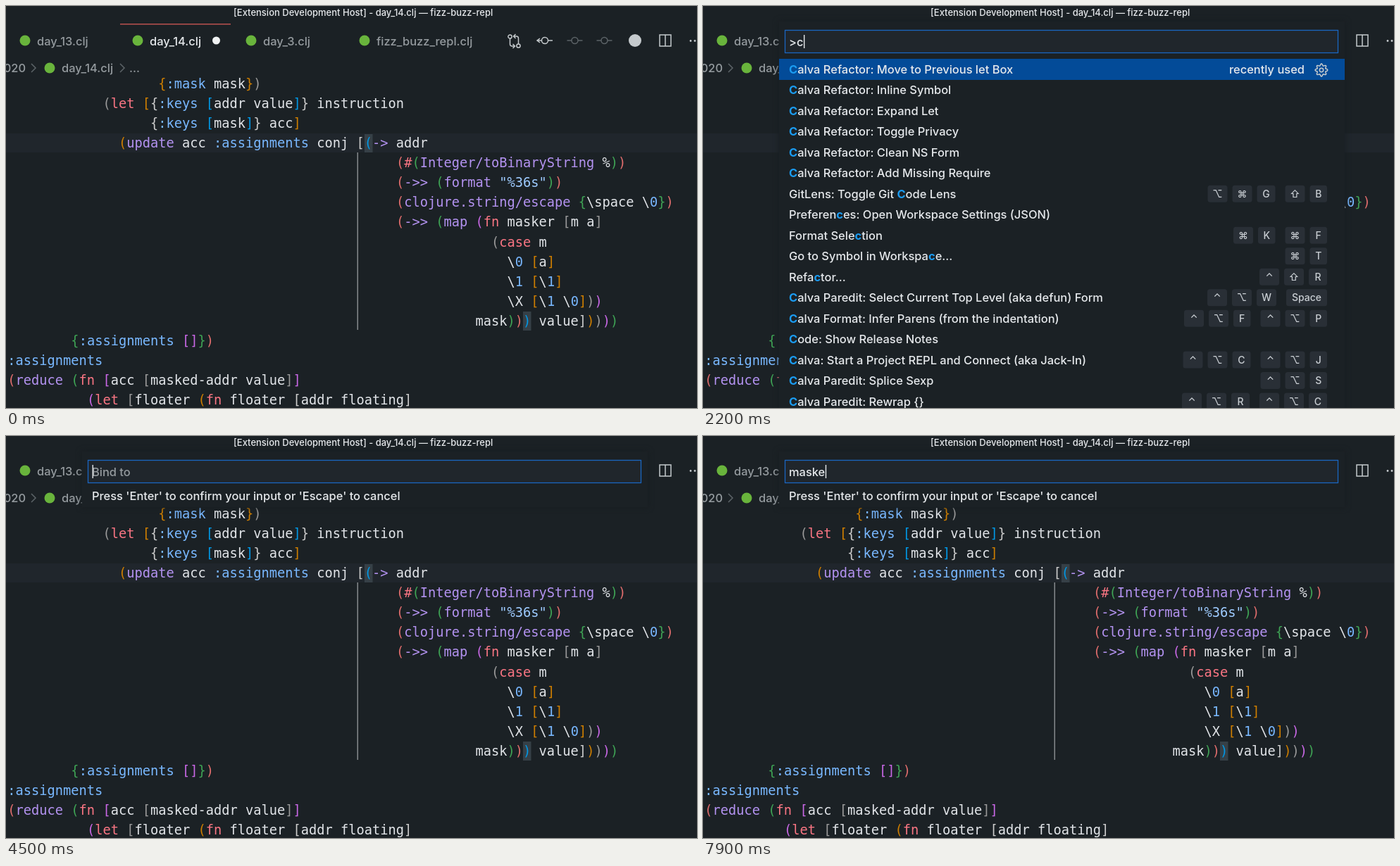
These frames come from a looping animation (981 by 571 pixels, 8 s). An HTML page:

```html
<!DOCTYPE html>
<html lang="en">
<head>
<meta charset="utf-8">
<title>Command palette</title>
<style>
  html, body { margin: 0; width: 100%; height: 100%; overflow: hidden; background: #1b2125; }
  svg { display: block; width: 981px; height: 571px; }
  text { white-space: pre; }
  .ui { font: 500 16.45px Inter, 'DejaVu Sans', sans-serif; fill: #e6e9ec; }
  .dim { fill: #959b9f; }
  .title { font-size: 13px; }
  .code { font: 18.7px 'DejaVu Sans Mono', monospace; fill: #e1e4e8; }
  .hit { fill: #1b9cf2; font-weight: 700; }
  .key { font-size: 14px; fill: #c8cdd2; text-anchor: middle; }
  .end { text-anchor: end; }
  .icon { fill: none; stroke: #c5cacd; stroke-width: 1.5; }
  .off { stroke: #5c6367; }
  #palette { filter: drop-shadow(0 0 4px #171c20); }
</style>
</head>
<body>
<svg viewBox="0 0 981 571">
  <rect width="981" height="571" fill="#1b2125"/>
  <g id="editor"></g>
  <g id="palette"></g>
  <g id="frame"></g>
</svg>
<script>
const LOOP = 8000;
const BG = '#1b2125';
const ROW = 29.47;
const $ = id => document.getElementById(id);
const rect = (x, y, w, h, fill, extra = '') =>
  `<rect x="${x}" y="${y}" width="${w}" height="${h}" fill="${fill}" ${extra}/>`;
const text = (x, y, s, cls = '') => `<text x="${x}" y="${y}" class="ui ${cls}">${s}</text>`;
const dot = (x, y, r, fill) => `<circle cx="${x}" cy="${y}" r="${r}" fill="${fill}"/>`;
const icon = (d, cls = '') => `<path class="icon ${cls}" d="${d}"/>`;
const ring = (x, y, r) => `M${x - r} ${y}a${r} ${r} 0 1 0 ${2 * r} 0a${r} ${r} 0 1 0 ${-2 * r} 0`;

// Source code, each line with its indentation column
const code = [
  [19, '{:mask mask})'],
  [12, '(let [{:keys [addr value]} instruction'],
  [18, '{:keys [mask]} acc]'],
  [14, '(update acc :assignments conj [(-> addr'],
  [49, '(#(Integer/toBinaryString %))'],
  [49, '(->> (format "%36s"))'],
  [49, '(clojure.string/escape {\\space \\0})'],
  [49, '(->> (map (fn masker [m a]'],
  [61, '(case m'],
  [63, '\\0 [a]'],
  [63, '\\1 [\\1]'],
  [63, '\\X [\\1 \\0]))'],
  [59, 'mask))) value]))))'],
  [8, '{:assignments []})'],
  [0, ':assignments'],
  [0, '(reduce (fn [acc [masked-addr value]]'],
  [10, '(let [floater (fn floater [addr floating]'],
];
const rainbow = ['#cccccc', '#0098e6', '#e16d6d', '#3fa455', '#c968e6', '#999999', '#ce7e00'];
const calls = /^(update|Integer\/toBinaryString|format|clojure\.string\/escape|map|reduce|->>?)$/;

function tokenColor(token) {
  if (/^(let|fn|case|#)$/.test(token)) return '#f97583';
  if (calls.test(token)) return '#b392f0';
  if (token[0] === ':' || /^\d$/.test(token)) return '#79b8ff';
  if (token[0] === '"') return '#9ecbff';
  return '#e1e4e8';
}

function drawCode() {
  let depth = 6;
  return code.map(([col, line], i) => {
    const spans = line.match(/[()[\]{}]|"[^"]*"|\s+|\\|#|[^\s()[\]{}"\\#]+/g).map(token => {
      let fill = tokenColor(token);
      if (/[([{]/.test(token)) fill = rainbow[depth++ % 7];
      else if (/[)\]}]/.test(token)) fill = rainbow[--depth % 7];
      return `<tspan fill="${fill}">${token}</tspan>`;
    }).join('');
    return `<text class="code" x="${2.3 + col * 11.258}" y="${117 + i * 28.07}">${spans}</text>`;
  }).join('');
}

const GREEN = '#69b43c';
const tabs = [[27, 'day_13.clj'], [187, 'day_14.clj'], [348, 'day_3.clj'], [509, 'fizz_buzz_repl.clj']];

function drawEditor() {
  const commit = (x, cls) => icon(ring(x, 49, 4.5) + `M${x - 11} 49h6.5M${x + 4.5} 49h6.5`, cls);
  return rect(0, 181, 981, 27, '#20262c') +
    rect(509, 182, 11.5, 26, '#364047') + rect(734, 434, 11.5, 27, '#364047') +
    rect(498.5, 208, 1.5, 252, '#858a8d') + drawCode() +
    rect(162, 25, 157, 1.5, '#b9504f') +
    tabs.map(([x, name], i) => dot(x, 49, 7.5, GREEN) + text(x + 17, 56, name, i === 1 ? '' : 'dim')).join('') +
    dot(298.5, 49, 5.5, '#f0f2f3') +
    text(28, 94, '020', 'dim end') + icon('M36 82l6 6l-6 6M162 82l6 6l-6 6', 'off') +
    dot(62, 88, 7.5, GREEN) + text(79, 94, 'day_14.clj', 'dim') + text(175, 94, '...', 'dim') +
    icon(ring(715.5, 43.5, 2.6) + ring(727.5, 56.5, 2.6) +
      'M715.5 46v8q0 3 3 3h4m-3-3l3 3l-3 3M727.5 54v-8q0-3-3-3h-4m3-3l-3 3l3 3') +
    icon('M754 49h6.5M769.5 49h6.5M758 46l-4 3l4 3' + ring(765, 49, 4.5)) +
    commit(807.5, 'off') + commit(849.5, 'off') + dot(893, 49, 9, '#c5cacd') +
    icon('M928 41h16v16h-16zM936 41v16') +
    [972, 978].map(x => dot(x, 49.5, 1.4, '#c5cacd')).join('');
}

// Palette entries: label | key chords
const refactor = s => 'Calva Refactor: ' + s;
const recent = [
  ...['Move to Previous let Box', 'Inline Symbol', 'Expand Let', 'Toggle Privacy',
    'Clean NS Form', 'Add Missing Require'].map(refactor),
  'GitLens: Toggle Line Blame',
  'GitLens: Toggle Git Code Lens|⌥⌘G ⇧B',
  'Preferences: Open Workspace Settings (JSON)',
  'Format Selection|⌘K ⌘F',
  'Go to Symbol in Workspace...|⌘T',
  'Refactor...|⌃⇧R',
  'Calva Paredit: Select Current Top Level (aka defun) Form|⌃⌥W _',
  'File: Revert File',
  'Calva Format: Infer Parens (from the indentation)|⌃⌥F ⌃⌥P',
  'Code: Show Release Notes',
  'Developer: Reload Window|⌘R',
  'Calva: Start a Project REPL and Connect (aka Jack-In)|⌃⌥C ⌃⌥J',
  'Calva Paredit: Splice Sexp|⌃⌥S',
  'Calva Paredit: Rewrap {}|⌃⌥R ⌃⌥C',
  'Calva Paredit: Rewrap ()|⌃⌥R ⌃⌥P',
];
const others = [
  'Calva Format: Format and Align Current Form (recursively, exper...|⌃⌥L',
  'Calva Paredit: Raise Sexp|⌃⌥P ⌃⌥R',
  'Calva Paredit: Rewrap ""|⌃⌥R ⌃⌥Q',
  'Calva Paredit: Rewrap []|⌃⌥R ⌃⌥S',
  ...['Extract to New Function', 'Introduce let (Creates a new let box with the binding)',
    'Thread First'].map(refactor),
];

function matches(label, query) {
  if (query.length < 2) return label.toLowerCase().includes(query);
  return new RegExp([...query].map(c => '\\b' + c).join('.*'), 'i').test(label);
}

// Marks each typed letter, preferring the start of a word
function mark(label, query) {
  let out = '', rest = label;
  for (const c of query) {
    let at = rest.search(new RegExp('\\b' + c, 'i'));
    if (at < 0) at = rest.toLowerCase().indexOf(c);
    out += rest.slice(0, at) + `<tspan class="hit">${rest[at]}</tspan>`;
    rest = rest.slice(at + 1);
  }
  return out + rest;
}

function drawKeys(chords, right, y) {
  let x = right, out = '';
  for (const key of [...chords].reverse()) {
    if (key === ' ') { x -= 7; continue; }
    const w = key === '_' ? 58 : /[⌃⌥⌘⇧W]/.test(key) ? 28 : /[CGRQ]/.test(key) ? 26 : 24.5;
    x -= w;
    out += rect(x, y - 18, w, 24, '#292f36', 'rx="3.5"') +
      text(x + w / 2, y - 1, key === '_' ? 'Space' : key, 'key');
    x -= 7;
  }
  return out;
}

function drawGear() {
  const rim = Array.from({ length: 49 }, (_, i) => {
    const a = i / 48 * 2 * Math.PI, r = 7.6 + 1.4 * Math.cos(8 * a);
    return `${i ? 'L' : 'M'}${878 + r * Math.cos(a)} ${91 + r * Math.sin(a)}`;
  }).join('');
  return icon(rim + ring(878, 91, 2.7));
}

function drawList(query) {
  const found = recent.filter(s => matches(s, query));
  const split = found.length;
  const rows = found.concat(others.filter(s => matches(s, query))).slice(0, 17);
  const list = rows.map((row, i) => {
    const [label, chords = ''] = row.split('|');
    const first = i === split, y = 96 + i * ROW + (first ? 1 : 0);
    return (first ? rect(108, 369.5, 803, 1, '#434a50') + text(886, y, 'other commands', 'end') : '') +
      text(122, y, mark(label, query)) + drawKeys(chords, first ? 743 : 886, y);
  }).join('');
  return rect(108, 22, 803, rows.length > 16 ? 560 : 84 + (rows.length - 1) * ROW, BG) +
    rect(108, 75, 803, 30, '#034b98') + list +
    text(854, 96, 'recently used', 'end') + drawGear() +
    (query === 'cr' ? rect(897, 105, 14, 90, '#272d33') : '');
}

function drawPalette({ command, input }) {
  const body = command ? drawList(input.slice(1))
    : rect(108, 22, 803, 79, BG) +
      text(122, 90.5, "Press 'Enter' to confirm your input or 'Escape' to cancel");
  return body + rect(116.5, 34.5, 785, 32, '#20262c', 'stroke="#1a66c0" stroke-width="1.3"') +
    (input ? '' : text(122, 56.5, 'Bind to', 'dim')) +
    `<text id="typed" class="ui" x="122" y="56.5">${input}</text>` +
    rect(0, 41, 1.4, 19, '#e6e9ec', 'id="caret"');
}

const command = (at, input) => ({ at, input, command: true });
const bind = (at, input) => ({ at, input });
const steps = [
  { at: 0 },
  command(400, '>'), command(1600, '>c'), command(2500, '>cr'), command(3000, '>crm'), command(3400, '>crml'),
  bind(4300, ''), bind(6300, 'm'), bind(6700, 'ma'), bind(7050, 'mas'), bind(7400, 'mask'), bind(7700, 'maske'),
];

let shown;
function render(t) {
  const step = steps.filter(s => s.at <= t).pop();
  if (step === shown) return;
  shown = step;
  $('palette').innerHTML = step.input === undefined ? '' : drawPalette(step);
  if ($('typed')) $('caret').setAttribute('x', 122.5 + $('typed').getComputedTextLength());
}

$('editor').innerHTML = drawEditor();
$('frame').innerHTML = text(323, 14, '[Extension Development Host] - day_14.clj — fizz-buzz-repl', 'title');

const start = performance.now();
function tick() {
  render((performance.now() - start) % LOOP);
  requestAnimationFrame(tick);
}
tick();
</script>
</body>
</html>
```
